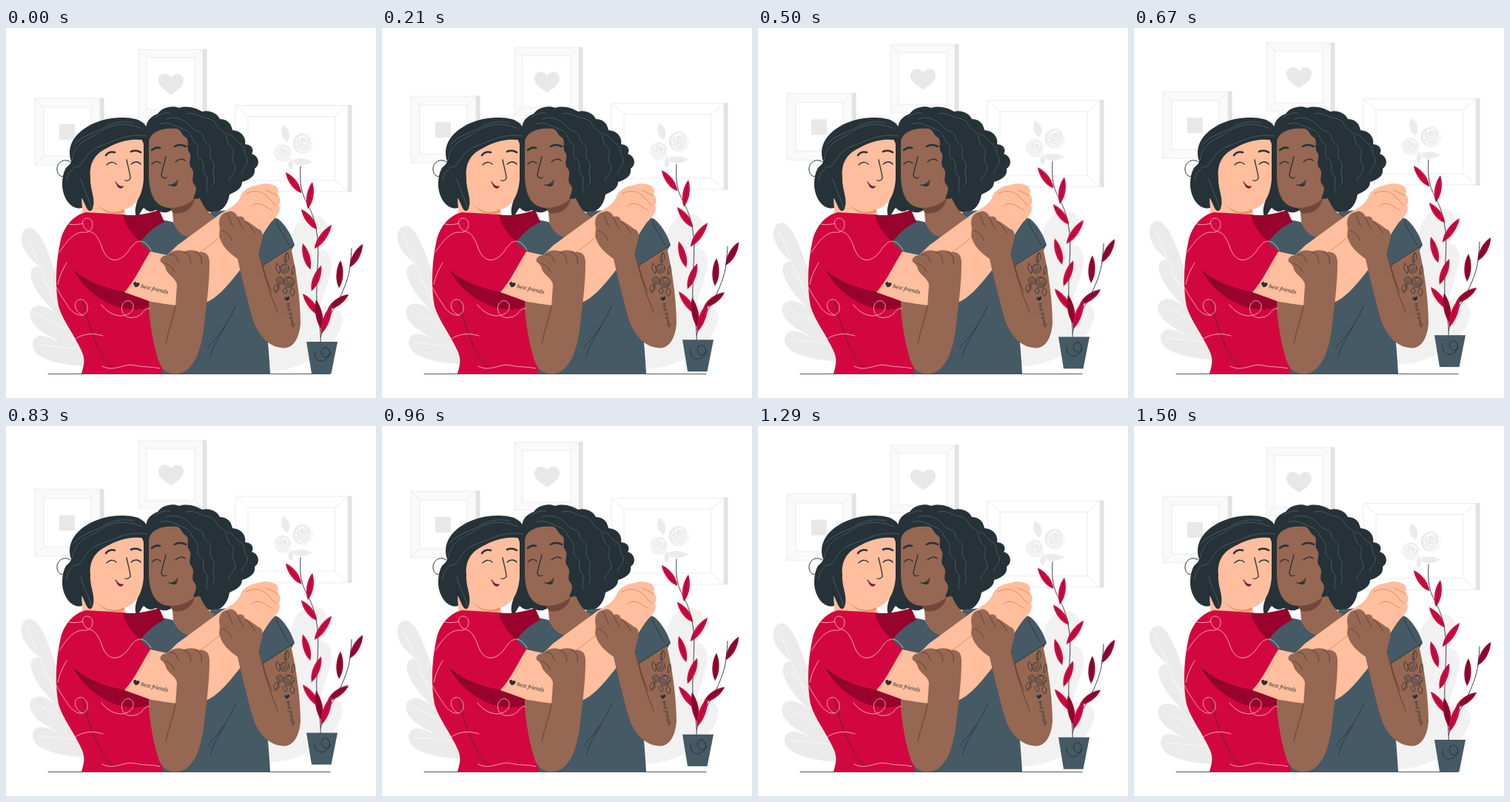
Recreate the animation shown at these times as an HTML page. Size 500 by 500 pixels, loop 1.54 s.

```html
<!DOCTYPE html>
<html lang="en">
<head>
<meta charset="utf-8">
<title>Best friends</title>
<style>
  html, body { margin: 0; width: 100%; height: 100%; overflow: hidden; background: #fff; }
  svg { display: block; width: 100vw; height: 100vh; }
  .float { animation: float 1540ms infinite; }
  @keyframes float {
    0% { transform: translateY(0); animation-timing-function: steps(18, end); }
    48.701% { transform: translateY(-10px); animation-timing-function: steps(18, end); }
    97.402%, 100% { transform: translateY(0); }
  }
  .line { fill: none; stroke-linecap: round; stroke-linejoin: round; }
  .ink { stroke: #263238; }
  .peach { fill: #ffbe9d; }
  .brown { fill: #966752; }
  .hair { fill: #263238; }
  .red { fill: #d3073f; }
  .deep { fill: #97032d; }
  .slate { fill: #455a64; }
  .shine { stroke: #455a64; stroke-width: 1; }
  .fold { stroke: #5f3c31; stroke-width: .9; }
  .blush { stroke: #d98660; stroke-width: .9; }
  .swirl { stroke: #f9c5d1; stroke-width: .8; }
  text { font: italic 7px "Noto Serif", serif; fill: #263238; }
</style>
</head>
<body>
<svg viewBox="0 0 500 500">
  <defs>
    <path id="heart" d="M0 14C-7 9-17 3-17-5C-17-15-5-17 0-9C5-17 17-15 17-5C17 3 7 9 0 14Z"/>
    <g id="rose" class="line">
      <path d="M-7-3C-9 4-4 9 1 8C8 7 9 0 7-5C3-9-4-8-7-3ZM-4-4C-2-8 4-6 3-2C2 2-4 1-4-4ZM-7 0C-3 5 4 4 7-3M-5 5C0 7 5 5 8 0"/>
    </g>
  </defs>

  <g class="float" id="wall" stroke="#e6e6e6" stroke-width=".8"></g>

  <g class="float">
    <path fill="#ebebeb" d="M22 293C17 274 29 266 38 272C52 284 60 312 72 345L112 457C88 457 60 452 46 443C32 435 33 418 46 416C55 415 63 421 72 424C58 416 41 408 35 396C28 382 36 375 46 375C55 376 62 381 69 388C56 373 42 361 35 341C30 326 38 319 48 323C54 326 59 332 63 337C50 325 27 311 22 293Z"/>
    <path fill="#f1f1f1" d="M388 275C395 255 417 247 429 258C440 270 434 285 425 300C440 300 443 319 437 337C432 355 427 367 425 378C440 371 458 382 454 399C448 426 412 461 357 464V405Z"/>
    <path class="line" stroke="#fafafa" d="M29 282C50 330 70 390 108 450M42 333L73 366M40 385L84 407M45 428L94 433M424 264C410 320 401 390 363 455M449 391L386 431"/>
  </g>

  <path class="line ink" stroke-width=".8" d="M57 467.5H438"/>

  <g class="float">
    <path class="line ink" stroke-width=".9" d="M425 425C427 408 418 382 420 350C420 325 424 300 420 277C416 251 409 242 403 229C398 217 397 206 398 187M425 418C431 396 441 384 448 371C456 354 464 337 465 320C466 312 467 304 467 298"/>
    <g id="sprigs"></g>
    <path class="slate" d="M406 424H448L439.500 467H413Z"/>
    <path class="line ink" d="M417 438C416 445 421 451 428 450C437 447 440 438 435 433C430 428 424 435 427 441C430 447 436 445 439 440"/>
  </g>

  <!-- right friend: hair, body, face -->
  <path class="hair" d="M184 148C183 138 190 136 190 130C193 121 200 118 205 116C211 107 225 104 234 108C246 104 258 109 265 113C276 110 286 116 289 123C301 123 305 132 306 138C319 139 325 149 323 157C334 158 335 166 332 170C342 173 344 185 336 190C338 201 326 206 319 208C319 218 308 222 302 225C300 240 290 248 282 250L255 244L224 246C214 253 207 247 202 246C193 251 189 245 186 243C183 246 181 252 177 256C171 247 178 234 182 219Z"/>
  <path class="slate" d="M176 292L205 258L225 262C240 282 262 270 278 248L330 244L368 258C379 268 386 280 390 293L384 303L345 332L352 400C354 425 356 445 357 467H204L196 372Z"/>
  <path class="brown" d="M224 236L226 263C231 276 241 285 257 283L282 255C273 249 268 244 262 230Z"/>
  <path fill="#70483a" d="M221 243C237 243 247 238 255 231C253 243 241 253 226 250Z"/>
  <path class="brown" d="M193 155C194 140 211 134 231 136C237 138 238 145 243 148C249 152 243 160 247 167C253 174 245 181 250 189C257 196 249 203 254 211C260 217 255 223 253 232C242 240 230 243 221 243C202 242 194 226 193 202Z"/>
  <g class="line shine">
    <path d="M217 123C232 117 244 127 251 134C255 141 266 138 267 148C268 157 279 158 276 168C273 178 284 181 281 190C277 199 286 204 279 213"/>
    <path d="M244 116C256 113 262 121 272 122C285 124 282 133 291 138C302 144 295 153 303 159C313 168 302 175 308 183C315 193 302 198 301 207"/>
    <path d="M208 130C222 125 230 134 240 137C251 140 249 149 257 156C263 163 254 171 263 177C272 184 262 192 270 199C276 207 267 214 273 222"/>
    <path d="M299 143C309 145 309 154 317 157C326 164 320 171 326 177C328 186 320 189 318 197M202 121C207 117 213 114 221 115"/>
  </g>
  <g class="line ink" stroke-width="1.300">
    <path d="M197 184C200 180 206 179 209 183M229 181C233 177 239 176 242 179M216 174C214 184 210 194 210 200C212 203 215 203 217 202"/>
    <path stroke-width="2.600" d="M197 165C200 162 204 161 208 162M228 160C233 157 239 158 243 160"/>
    <path d="M220 212C225 213 230 210 232 206"/>
  </g>
  <path class="hair" d="M222 212C226 213 230 211 232 208C232 213 227 217 222 212Z"/>

  <!-- left friend -->
  <path class="peach" d="M103 210L103 250C125 262 145 270 162 257L159 238Z"/>
  <path class="deep" d="M157 252C173 255 190 251 207 246L214 262C199 269 188 280 180 291C167 284 160 270 157 252Z"/>
  <path class="red" d="M108 249C126 250 145 251 158 252C162 272 177 287 196 302L195 374C193 402 206 428 212 467H102C106 454 107 447 102 436C92 414 77 396 71 376C66 350 67 316 74 286C78 270 90 253 108 249Z"/>
  <path class="deep" d="M91 327C111 344 138 353 163 357L197 369V376C177 384 153 381 133 369C115 359 100 344 91 327Z"/>
  <path class="brown" d="M193 366C192 391 199 429 207 452C211 463 220 468 232 467L250 390L230 368Z"/>
  <path class="line" stroke="#263238" stroke-width=".7" d="M91 327C100 338 110 346 121 349M103 366C112 402 123 442 146 461"/>
  <g class="line swirl">
    <path d="M72 303C81 290 91 276 104 276C119 278 121 258 110 257C100 257 102 271 113 275C122 277 126 286 131 300C138 317 153 318 165 302C174 288 184 280 196 300"/>
    <path d="M68 350C73 360 77 366 82 373C88 385 102 393 108 385C114 377 107 365 99 367C91 369 91 382 103 388"/>
    <path d="M129 374C142 392 164 393 171 381C176 370 163 364 158 373C153 382 160 394 173 391C185 390 186 377 194 379"/>
    <path d="M92 421C105 412 119 412 131 416M130 457C147 466 160 452 174 456C187 459 196 457 208 460M78 262C84 266 93 267 104 264M82 317C76 327 72 337 70 346"/>
  </g>
  <path fill="#e9956f" d="M122 237C136 252 152 250 160 244L160 249C146 255 132 250 122 237Z"/>
  <path class="peach" d="M108 190C109 170 127 155 153 149C173 145 185 147 186 158V203C185 227 174 245 155 246C132 246 115 232 110 211Z"/>
  <path class="hair" d="M188 152C169 148 151 154 135 163C120 170 112 184 114 201C113 218 122 231 117 244C114 250 110 247 107 239C102 229 102 224 103 243C90 247 77 232 76 213C76 204 77 196 81 189C84 186 88 183 88 180C82 161 91 145 109 134C126 122 157 118 175 123C189 127 195 138 191 149Z"/>
  <path class="line ink" d="M87 181C78 175 68 182 69 192C70 199 75 203 80 199M191 150C194 141 198 137 199 131"/>
  <g class="line shine">
    <path d="M89 179C93 153 112 151 129 139C145 129 163 127 184 136M91 159C105 143 122 142 137 132C149 126 163 126 172 128"/>
    <path d="M97 189C107 178 112 164 126 160C143 155 163 141 190 146M101 203C103 217 113 230 115 243M82 206C83 196 90 188 96 187"/>
  </g>
  <g class="line ink" stroke-width="1.300">
    <path d="M136 185C139 181 145 180 149 184M169 184C173 180 179 180 182 184M163 178C165 188 168 198 168 203C167 206 164 207 161 206"/>
    <path stroke-width="2.600" d="M135 172C138 168 143 167 147 168M169 167C174 165 179 166 182 168"/>
    <path d="M148 208C151 213 155 215 158 214"/>
  </g>
  <path fill="#8f0931" d="M149 210C152 214 156 215 159 214C156 219 151 217 149 210Z"/>

  <!-- embracing arms -->
  <path class="peach" d="M195 302L218 307L231 294L291 250C306 242 312 237 316 230C319 219 329 214 341 212C349 209 359 210 365 214C369 218 368 222 367 225C373 232 370 237 369 240C373 249 363 257 357 264C344 282 328 312 314 330C298 350 284 366 270 371C240 379 219 373 196 370L160 357C174 342 184 319 195 302Z"/>
  <path class="line blush" d="M260 304C274 297 281 288 291 281M324 224C334 219 343 220 350 225C357 230 360 237 365 240M332 241C341 232 349 241 359 246M351 219C358 222 363 224 367 227"/>
  <use href="#heart" class="hair" transform="translate(176 347) rotate(15) scale(.25)"/>
  <text transform="translate(182 351) rotate(13)">best friends</text>

  <path class="brown" d="M232 467C255 465 265 431 268 400C271 374 275 345 275 317C275 306 269 302 261 303C254 299 246 300 241 302C233 299 223 301 219 307C212 307 207 311 209 316C214 319 215 323 217 328C221 335 230 339 231 347L229 377C223 400 213 430 212 458Z"/>
  <path class="line fold" d="M220 307C226 304 230 307 233 317M240 303C247 304 249 310 250 318M256 302C264 306 265 312 264 319M216 318C222 321 226 324 227 329M229 376C226 393 219 410 216 426"/>

  <path class="line" stroke="#263238" stroke-width=".8" d="M310 376C302 397 286 417 273 432M296 404C286 420 282 426 276 444"/>
  <path class="brown" d="M289 270C286 258 291 249 299 249C305 245 311 250 313 255C320 253 322 257 323 260C331 263 337 270 344 273C351 282 342 294 342 306L347 321L385 297C392 326 398 367 398 399C396 423 386 435 371 432C351 429 337 410 331 385C324 358 318 335 313 312C303 305 290 294 288 280Z"/>
  <path class="line fold" d="M342 305C348 329 354 352 367 385M347 321C350 333 354 346 359 357M298 251C304 256 301 262 308 269M312 256C316 260 316 266 322 272M324 262C331 268 333 272 337 277M291 274C299 275 301 280 305 286"/>
  <path class="line ink" stroke-width=".8" d="M389 294L347 321M365 261C369 272 376 282 382 293"/>

  <!-- tattoos -->
  <g stroke="#263238" stroke-width=".8">
    <use href="#rose" transform="translate(376 325) scale(.8)"/>
    <use href="#rose" transform="translate(382 343) rotate(35) scale(.9)"/>
    <use href="#rose" transform="translate(370 341) rotate(80) scale(.6)"/>
    <path class="line" d="M378 317C374 311 377 307 380 303C384 309 382 314 378 317ZM369 331C364 328 364 322 366 318C371 323 372 327 369 331ZM367 347C361 347 361 354 364 357C369 355 371 351 367 347ZM386 351C391 353 390 359 388 362C383 360 383 355 386 351ZM387 333C385 328 387 324 389 321C392 327 390 331 387 333ZM378 351C372 353 374 360 379 358C380 355 380 353 378 351M379 304L378 317M365 357L369 346"/>
  </g>
  <use href="#heart" class="hair" transform="translate(380 366) rotate(-8) scale(.2)"/>
  <text transform="translate(379 372) rotate(77) scale(.9)">best friends</text>
</svg>
<script>
  const $ = id => document.getElementById(id);

  // Picture frame: outer box, inner margins, mitred corners and a side strip.
  function frame(x, y, w, h, mx, my, fill) {
    const r = x + w, b = y + h, ix = x + mx, iy = y + my, ir = r - mx, ib = b - my;
    return `<path fill="#e3e3e3" stroke="#dadada" d="M${r} ${y}h5v${h}h-5z"/>
      <path fill="${fill}" d="M${x} ${y}h${w}v${h}h${-w}z"/>
      <path fill="#fff" d="M${ix} ${iy}H${ir}V${ib}H${ix}z"/>
      <path d="M${x} ${y}L${ix} ${iy}M${r} ${y}L${ir} ${iy}M${x} ${b}L${ix} ${ib}M${r} ${b}L${ir} ${ib}"/>`;
  }

  $('wall').innerHTML =
    frame(39, 95, 88, 90, 12, 12, '#fafafa') +
    '<path fill="#e8e8e8" stroke="none" d="M72 130h21v21H72z"/>' +
    frame(179, 29, 87, 92, 11, 11, '#fafafa') +
    '<use href="#heart" fill="#e8e8e8" stroke="none" x="223" y="76"/>' +
    frame(310, 104.5, 152, 116.500, 17, 15, '#fff') +
    `<path fill="#ebebeb" stroke="none" d="M374 131C384 136 386 147 380 154C371 148 371 139 374 131ZM386 180C394 174 406 176 414 181C404 186 393 188 386 180ZM386 176C380 181 380 188 385 192C389 187 390 181 386 176Z"/>
    <g fill="#ebebeb" stroke="none"><circle cx="401" cy="156" r="13.500"/><circle cx="374" cy="169" r="11.500"/></g>
    <g stroke="#fff"><use href="#rose" transform="translate(402 156) scale(1.400)"/><use href="#rose" transform="translate(374 169) rotate(50) scale(1.200)"/></g>`;

  // Pointed leaf from base (x, y) to tip (u, v).
  function leaf([x, y, u, v, dark]) {
    const dx = u - x, dy = v - y, k = 6.4 / Math.hypot(dx, dy);
    const at = (t, s) => `${x + dx * t - dy * k * s} ${y + dy * t + dx * k * s}`;
    return `<path class="${dark ? 'deep' : 'red'}" d="M${x} ${y}C${at(.25, 1)} ${at(.72, .9)} ${u} ${v}C${at(.72, -.9)} ${at(.25, -1)} ${x} ${y}"/>
      <path class="line ink" stroke-width=".6" d="M${x} ${y}L${at(.85, 0)}"/>`;
  }

  $('sprigs').innerHTML = [
    [399, 223, 378, 195], [408, 244, 414, 208], [420, 272, 399, 245],
    [417, 298, 440, 266], [411, 326, 401, 291], [413, 355, 426, 321],
    [424, 389, 401, 359], [435, 380, 463, 360, 1], [450, 351, 452, 314, 1],
    [465, 323, 482, 292, 1], [427, 408, 419, 367, 1], [426, 413, 440, 374]
  ].map(leaf).join('');
</script>
</body>
</html>
```
